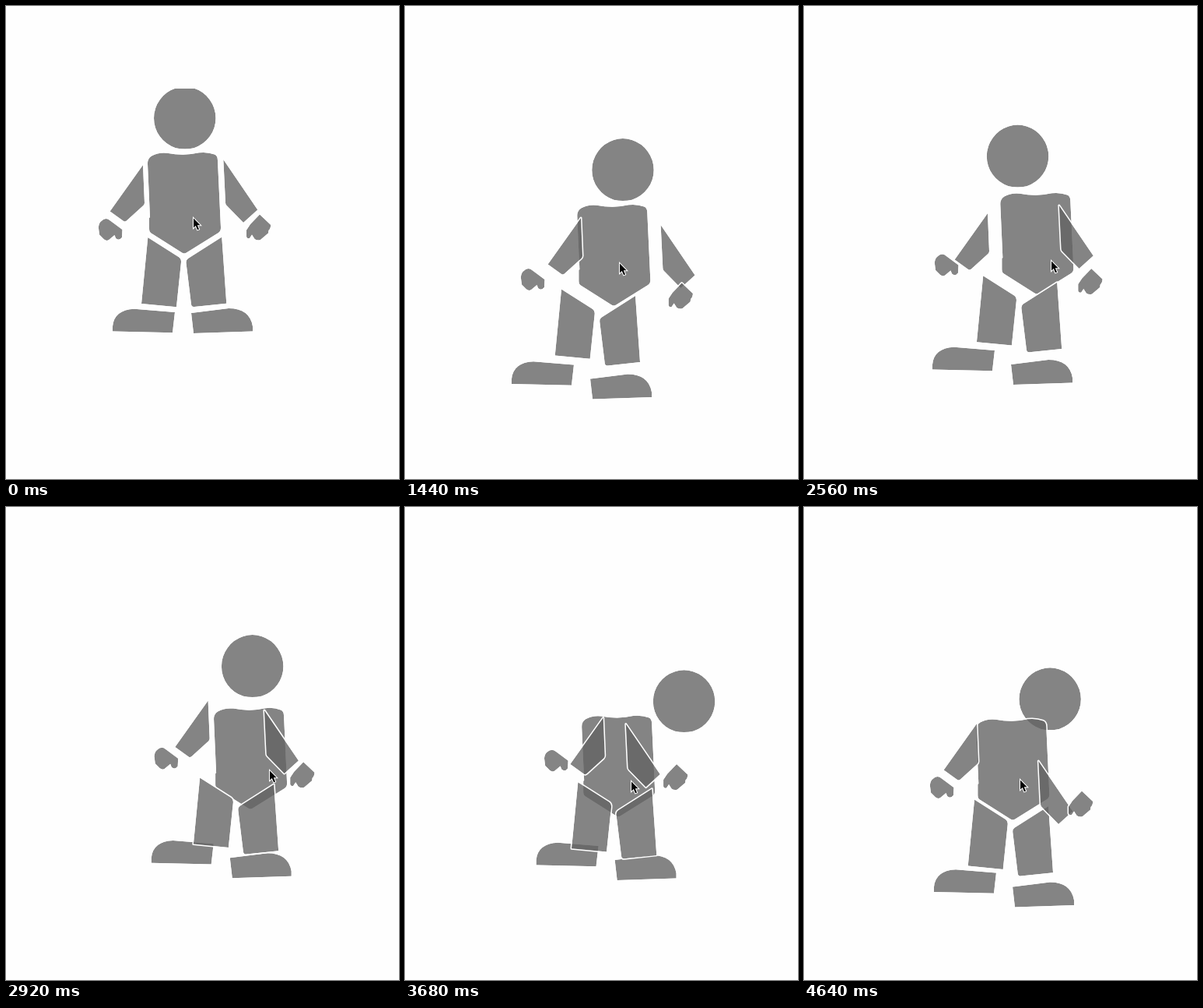
Animation of 505x607 px, one loop 4.68 s. Source, as an HTML page with a canvas:

```html
<!DOCTYPE html>
<html lang="en">
<head>
<meta charset="utf-8">
<title>Loose puppet</title>
<style>
html, body { margin: 0; width: 100%; height: 100%; overflow: hidden; background: #fefefe; }
canvas { display: block; }
</style>
</head>
<body>
<canvas id="stage" width="505" height="607"></canvas>
<script>
const ctx = document.getElementById('stage').getContext('2d');
const W = 505, H = 607, LOOP = 4680, STEP = 40, GRAB = 480;
const PAPER = '#fefefe', GREY = 'rgba(100,100,100,.79)';
const HOME = [240, 270], ASIDE = [-79, -9];

const clamp = u => Math.min(1, Math.max(0, u));
const ease = u => clamp(u) ** 2 * (3 - 2 * clamp(u));
const add = (a, b) => [a[0] + b[0], a[1] + b[1]];
const mix = (a, b, u) => a + (b - a) * u;

// Where the pointer drags the puppet: [ms, x, y]
const drag = [
  [GRAB, 0, 0], [880, 19, 21], [1440, 35, 58], [2000, 31, 55], [2560, 77, 55], [2920, 98, 66],
  [3280, 71, 78], [3480, 58, 54], [3680, 50, 80], [4040, 29, 70], [4240, 22, 86], [4640, 37, 78]
];

// How far the free parts swing away from the pointer, at each beat
const beats = [GRAB, 880, 1440, 2560, 3280, 4040, 4640];
const swing = (...points) => [[0, 0], ...points].map((p, i) => [beats[i], ...p]);
const swings = {
  torso: swing([3.5, 36], [4.3, 9], [-6.7, -3], [-15.7, 10], [5.5, -9], [2.3, 6]),
  head: swing([18.4, 17.2], [15.2, 8.5], [-32.2, -6], [26.3, 1.7], [110.7, 43.5], [49.4, 24.7]),
  armL: swing([24, -9], [15, 10], [-17, 7], [-2, -43.5], [49, 16.5], [9, -4]),
  armR: swing([-14.5, 6.3], [14.3, 26], [-28.5, 4], [-55.7, -4.2], [-31, 13], [-15, 51]),
  feet: swing([-17.5, -33], [-35, 18], [-49, 2.5], [-41, -36], [0, -16], [-7, 7])
};

// Smooth curve through timed keys, at rest before the first one
function follow(keys, t) {
  const last = keys.length - 1;
  if (t <= keys[0][0]) return keys[0].slice(1);
  if (t >= keys[last][0]) return keys[last].slice(1);
  const i = keys.findIndex(k => k[0] > t) - 1;
  const a = keys[i], b = keys[i + 1], span = b[0] - a[0], u = (t - a[0]) / span;
  const slope = (n, c) => n === 0 || n === last ? 0 :
    (keys[n + 1][c] - keys[n - 1][c]) / (keys[n + 1][0] - keys[n - 1][0]);
  return [1, 2].map(c => mix(a[c], b[c], ease(u)) +
    span * u * (1 - u) * ((1 - u) * slope(i, c) - u * slope(i + 1, c)));
}

// Legs trail between torso and feet, hands between arms and feet; the body leans to one side
function pose(t) {
  const p = {};
  for (const name in swings) p[name] = follow(swings[name], t);
  const lean = ease((t - GRAB) / (beats[1] - GRAB));
  const { torso, feet } = p;
  for (const [key, side] of [['L', -1], ['R', 1]]) {
    const shift = (x, y) => [x * lean, y * lean];
    p['leg' + key] = add([mix(torso[0], feet[0], .6), mix(torso[1], feet[1], .6)], shift(3, 4.5 * side - 1.5));
    p['hand' + key] = add([mix(p['arm' + key][0], feet[0], .5), feet[1]], shift(5, 12 * side));
    p['foot' + key] = add(feet, shift(0, 8.5 * side));
  }
  return p;
}

function part(name, outline) {
  const shape = new Path2D(outline), outside = new Path2D();
  outside.rect(-W, -H, 3 * W, 3 * H);
  outside.addPath(shape);
  return { name, shape, outside };
}

// Back to front
const parts = [
  part('head', 'M218 105.6 Q229.7 101.6 241.5 105.6 A40.2 40.2 0 0 1 241.5 182.2 Q229.7 184.6 218 182.2 A40.2 40.2 0 0 1 218 105.6Z'),
  part('torso', 'M182 203 Q181.5 196 187 192.5 Q196 187.5 207 188.7 Q229 193 248 188.3 Q259 187 268 190.5 Q272 192 272 198 L276 284 Q276.3 289 273 291 L232 316.5 Q229 318.5 226 316.5 L186.5 291.5 Q184 290 184 286 L184 272 L185 271Z'),
  part('footL', 'M137 417.5 L137 411 Q139 390 165 388.8 L217 393 L214 419.2Z'),
  part('footR', 'M238 394 L286 388 Q313 388 317 411 L317 417.5 L241 420Z'),
  part('legL', 'M182.3 297 L222.5 322.5 Q225.5 325 225 329 L219 386.3 L174 382Z'),
  part('legR', 'M277.3 296.5 L234 324 Q231 326 231.5 330 L238 383 Q238.5 386.5 242 386 L283.3 381.7Z'),
  part('armL', 'M176 204 L178 252.5 Q178 254.5 176.5 256 L155 275.5 Q153 277.3 151 276 L133.6 263.5Z'),
  part('armR', 'M279.3 197 L323.3 261.5 L305 278 L283.5 256 Q282 254.5 282 252.5Z'),
  part('handL', 'M118.8 284 Q119.5 278 122.5 276 Q128 270.5 134 275.5 L149.5 287 L149 297 Q145 302 141 298 L139.5 294 L132 300.3 Q129 302 126 299.5 L120 293.5Z'),
  part('handR', 'M326 267.5 L340.3 281 Q340 286 337.5 288 L337 291.5 L327 300 Q323 301.5 319.5 299 L316 293.5 L313 298 Q309.5 299 309 296 L309 287.5 L314 280Z')
];

function drawPart({ shape, outside }, [x, y]) {
  ctx.save();
  ctx.translate(x, y);
  ctx.fillStyle = GREY;
  ctx.fill(shape);
  ctx.clip(outside, 'evenodd');
  ctx.strokeStyle = '#fff';
  ctx.lineWidth = 3;
  ctx.lineJoin = 'round';
  ctx.stroke(shape);
  ctx.restore();
}

const arrow = new Path2D('M1 2.4 L1 14.6 L3.8 12 L6.1 17.2 L8 16.4 L5.8 11.2 L9.6 11.2Z');

function drawPointer([x, y]) {
  ctx.save();
  ctx.translate(Math.round(x), Math.round(y));
  ctx.strokeStyle = '#fff';
  ctx.lineWidth = 2;
  ctx.stroke(arrow);
  ctx.fillStyle = '#000';
  ctx.fill(arrow);
  ctx.restore();
}

function draw(t) {
  const pull = follow(drag, t), now = pose(t);
  ctx.fillStyle = PAPER;
  ctx.fillRect(0, 0, W, H);
  for (const p of parts) drawPart(p, add(now[p.name], pull));
  ctx.fillStyle = PAPER;
  ctx.fillRect(0, 0, W, 106);
  // The pointer slips aside, waits, then comes back to grab
  const away = ease(t / 120) - ease((t - 320) / (GRAB - 320));
  drawPointer(add(add(HOME, pull), ASIDE.map(v => v * away)));
}

const start = performance.now();
function tick() {
  const t = (performance.now() - start) % LOOP;
  draw(Math.floor(t / STEP) * STEP);
  requestAnimationFrame(tick);
}
tick();
</script>
</body>
</html>
```
